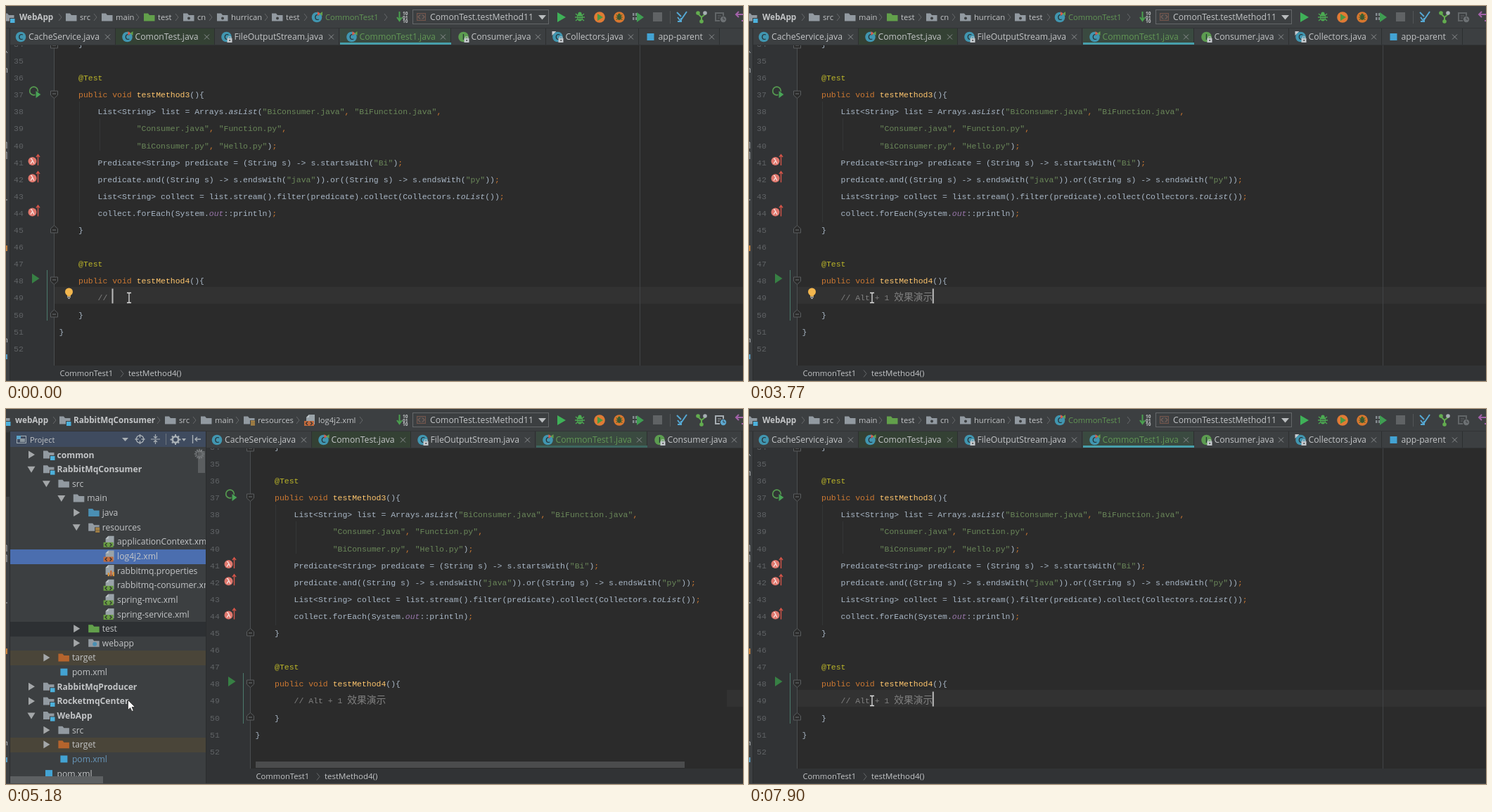
An HTML page for the animation above (8000 ms loop, 1048 px wide and 534 px high).

```html
<!DOCTYPE html>
<html lang="zh">
<head>
<meta charset="utf-8">
<title>Editor with project panel</title>
<style>
html, body { margin: 0; width: 100%; height: 100%; overflow: hidden; background: #2b2b2b; }
svg { display: block; }
text { font-family: "Open Sans", "Noto Sans", sans-serif; white-space: pre; }
.code text { font: 11.47px "Liberation Mono", "Noto Sans Mono", monospace; fill: #a9b7c6; }
.code .cjk { font: 300 13.76px "Noto Sans CJK SC", "Noto Sans CJK", sans-serif; }
.code .num { fill: #606366; }
.code .note, .code .note tspan { fill: #808080; }
.kw { fill: #cc7832; }
.ann { fill: #bbb529; }
.str { fill: #6a8759; }
.fn { fill: #ffc66d; }
.it { font-style: italic; }
.field { fill: #9876aa; font-style: italic; }

.anim { animation: 8s step-end infinite; }
.start-caret { animation-name: startCaret; }
.caret { animation-name: caret; }
.typed { animation-name: typed; }
.bulb { animation-name: bulb; }
.bar { animation-name: bar; }
.editor { animation-name: shift; }
.panel { animation-name: panel; }
.tree-focus { animation-name: treeFocus; }
.editor-focus { animation-name: editorFocus; }
.row { animation-name: row; }
.arrow { animation-name: arrow; }
.beam { animation-name: beam; }
.spin { animation-name: spin; transform-origin: 275px 64px; }
@keyframes startCaret { 0%, 8.875% { opacity: 1 } 3.5%, 13.875%, to { opacity: 0 } }
@keyframes caret {
  0%, 27.375%, 40.125%, 52.125%, 64.75% { opacity: 0 }
  13.875%, 34.75%, 47.125%, 59.125%, 95.75%, to { opacity: 1 }
}
@keyframes typed { 0% { opacity: 0 } 13.875%, to { opacity: 1 } }
@keyframes bulb { 0%, 24.25% { opacity: 1 } 13.875%, 59.125%, to { opacity: 0 } }
@keyframes bar { 0%, 18.875%, to { opacity: 1 } 15.375% { opacity: 0 } }
@keyframes shift { 0%, 92.375%, to { transform: none } 61% { transform: translateX(279px) } }
@keyframes panel { 0%, 92.375%, to { opacity: 0 } 61% { opacity: 1 } }
@keyframes treeFocus { 0%, 94.25%, to { opacity: 0 } 64.75% { opacity: 1 } }
@keyframes editorFocus { 0%, 94.25%, to { opacity: 1 } 64.75% { opacity: 0 } }
@keyframes row { 0%, 92.375%, to { opacity: 1 } 64.75% { opacity: 0 } }
@keyframes arrow { 0%, 92.375%, to { opacity: 0 } 59.125% { opacity: 1 } }
@keyframes beam { 0%, 92.375%, to { opacity: 1 } 59.125% { opacity: 0 } }
@keyframes spin {
  0% { opacity: 1; transform: none }
  62.875% { opacity: 1; transform: rotate(30deg) }
  64.75% { opacity: 1; transform: rotate(60deg) }
  66.375% { opacity: 1; transform: rotate(90deg) }
  68.25%, to { opacity: 0; transform: none }
}
</style>
</head>
<body>
<script>
const GRAY = '#929aa1', GREEN = '#62a04b', BLUE = '#4a8fb3', ORANGE = '#b5642d', LABEL = '#c3c5c7';

const esc = s => s.replace(/&/g, '&amp;').replace(/</g, '&lt;');
const rect = (x, y, w, h, fill, more = '') => `<rect x="${x}" y="${y}" width="${w}" height="${h}" fill="${fill}" ${more}/>`;
const path = (d, fill, more = '') => `<path d="${d}" fill="${fill}" ${more}/>`;
const line = (d, color, width = 1) => path(d, 'none', `stroke="${color}" stroke-width="${width}"`);
const disc = (x, y, r, fill, more = '') => `<circle cx="${x}" cy="${y}" r="${r}" fill="${fill}" ${more}/>`;
const label = (x, y, s, size = 12.2, fill = LABEL, more = '') =>
  `<text x="${x}" y="${y}" font-size="${size}" fill="${fill}" ${more}>${esc(s)}</text>`;
const at = (x, y, body) => `<g transform="translate(${x} ${y})">${body}</g>`;
const group = (name, body) => `<g class="${name}">${body}</g>`;
const anim = (name, body) => group('anim ' + name, body);
const BOLD = 'font-weight="700"';

// Icons, drawn around their centre
const folder = color => path('M-8-5.5h6l2 2.5h7.5v8.5h-15.5z', color);
const lock = rect(1, 2, 7, 6, '#c3c8cc') + line('M2.5 2v-2h4v2', '#c3c8cc') + rect(4, 4, 1.5, 2, '#444');
const ball = (letter, color) => disc(0, 0, 7.3, color) +
  label(0, 4, letter, 11, '#263238', 'text-anchor="middle" font-weight="600"');
const page = path('M-1-8h8v14h-12v-10z', '#9aa3a9') + path('M-1-8v4h-4z', '#c1c7cb');
const badge = color => page + rect(-8, 1, 14, 7, color) + line('M-3 2l-2.5 2.5 2.5 2.5M1 2l2.5 2.5-2.5 2.5', '#2f3133', 1.2);
const icons = {
  folder: folder(GRAY),
  green: folder(GREEN),
  blue: folder(BLUE),
  orange: folder(ORANGE),
  pack: folder(GRAY) + disc(0, 1.5, 2, '#3c3f41'),
  module: folder(GRAY) + rect(1, 1, 7.5, 7, '#3c3f41') + rect(2, 2, 6.5, 6, '#4cb1dc'),
  res: folder(GRAY) + rect(1, 0, 8, 8, '#3c3f41') + line('M2 1.5h6M2 4h6M2 6.5h6', '#d8a145', 1.4),
  web: folder(GRAY) + disc(1, 1.5, 3, BLUE),
  cls: ball('C', '#4196b0'),
  test: ball('C', '#4196b0') + path('M1-8l4 3-4 3z', '#d95b4c') + path('M8-8l-4 3 4 3z', GREEN),
  locked: ball('C', '#4196b0') + lock,
  iface: ball('I', '#5c9c50') + lock,
  marked: ball('C', '#4196b0') + path('M-8-8h6l-6 6z', '#c6cbd0') + lock,
  mvn: rect(-5, -5, 10, 10, '#43a3d3'),
  xml: badge('#689d42'),
  log: badge('#c1693b'),
  props: page + rect(-2, 3, 2.5, 5, '#d8913b') + rect(1.5, 0, 2.5, 8, '#c1693b') + rect(5, 2, 2.5, 6, '#d8913b'),
};
const icon = (name, x, y) => at(x, y, icons[name]);
const chevron = (x, y = 16) => line(`M${x - 2} ${y - 5}l4 5-4 5`, '#66696b');

// Navigation bar
const crumbs = (items, ends) => items.map(([kind, x, s, more, color]) =>
  icon(kind, x, 16) + label(x + (x < 5 ? 15 : 12), 20, s, more ? 11.7 : 11.2, color || LABEL, more || '')).join('') +
  ends.map(x => chevron(x)).join('');
const fileCrumbs = crumbs([
  ['module', 4, 'WebApp', BOLD], ['folder', 93, 'src'], ['folder', 144, 'main'], ['green', 204, 'test'],
  ['pack', 260, 'cn'], ['pack', 308, 'hurrican'], ['pack', 386, 'test'], ['test', 442, 'CommonTest1', '', '#629755'],
], [77, 127, 187, 243, 291, 370, 426, 540]);
const treeCrumbs = crumbs([
  ['module', -2, 'webApp', BOLD], ['module', 84, 'RabbitMqConsumer', BOLD], ['folder', 234, 'src'],
  ['folder', 285, 'main'], ['res', 346, 'resources'], ['log', 432, 'log4j2.xml'],
], [69, 217, 268, 329, 415, 505]);

const bug = color => line('M-6-5l12 10M6-5l-12 10M-7 0h14', color, 1.4) +
  `<ellipse rx="4" ry="5.5" fill="${color}"/>` + disc(0, -5, 2.6, color) + line('M-3-1h6M-3 2h6', '#3c3f41');
const history = (color, clock) => line('M-1 5h-6v-11h11v4', color, 2) + line('M-4-2h5M-4 1h3', color) + disc(4, 3, 4.2, clock) +
  line('M4 0v3h2.5', '#3c3f41');
const toolbar = rect(0, 0, 1048, 32, '#3c3f41') +
  anim('editor-focus', fileCrumbs) + anim('tree-focus', treeCrumbs) +
  line('M559.5 8v12M556 16l3.5 5 3.5-5', '#4ba04f', 2) +
  ['10', '01', '10'].map((s, i) => label(564, 13 + 5.5 * i, s, 6.5, '#c4c7c9', BOLD)).join('') +
  rect(578.5, 5.5, 193, 20, '#3c3f41', 'stroke="#646769"') + rect(584.5, 10.5, 12, 10, '#454546', 'stroke="#75564c"') +
  line('M589 12.5l-3 3 3 3M592 12.5l3 3-3 3', '#9a7468') +
  label(603, 20, 'ComonTest.testMethod11') + path('M757 13h11l-5.5 6.5z', '#b9bcbe') +
  path('M784 9l12 7-12 7z', '#3fb158') + at(816, 16, bug('#4cab52')) +
  disc(844, 16, 7.8, '#e07b35') + path('M841 11l8 5-8 5z', '#4a9a44') +
  at(872, 16, disc(0, 0, 7.8, '#d9772f') + `<g transform="scale(.72)">${bug('#3c612f')}</g>`) +
  [0, 1, 2, 3].map(i => rect(891 + 4 * (i % 2), 10 + 6 * (i >> 1), 2.5, 4, '#82898e')).join('') +
  path('M897 9l10 7-10 7z', '#3f9d52') + rect(920, 9, 13, 13, '#606365') + line('M944.5 7v18', '#535658') +
  line('M955 16l4 5 9-13M954 9l6 6M955 22h5v-5', '#55a7d2', 2) +
  line('M984 11l5 5 6-5M989 16v7', '#63ad4f', 2) + disc(984, 10, 2.8, '#63ad4f') + disc(994, 10, 2.8, '#a7afb4') +
  disc(989, 22, 2.8, '#63ad4f') +
  at(1016, 16, anim('editor-focus', history('#616567', '#6d7174')) + anim('tree-focus', history('#a6adb2', '#5ca8d0'))) +
  line('M1049 12h-11M1042 8l-4 4 4 4M1046 21h3', '#a261a8', 2);

// Editor tabs
const tabs = [
  [6, 'cls', 'CacheService.java', 155], [156, 'test', 'ComonTest.java', 296, '#344134'],
  [297, 'locked', 'FileOutputStream.java', 473], [475, 'test', 'CommonTest1.java', 632, '#3a4a40', '#629755'],
  [634, 'iface', 'Consumer.java', 767], [768, 'marked', 'Collectors.java', 899], [900, 'mvn', 'app-parent', 1014],
].map(([x, kind, s, end, fill = '#3c3f41', color = LABEL], i) =>
  rect(x, 32, end - x, 23, fill) + icon(kind, i ? x + 16.5 : 21, 44) +
  label(i ? x + 27.5 : 32, 48, s, 12.2, color) +
  line(`M${end - 14} 40.5l7 7m0-7l-7 7`, '#8b8e90') + rect(end, 32, 1, 23, '#2d2f30')).join('');

// Code
const rules = [['str', /"[^"]*"/], ['ann', /@Test/], ['kw', /\b(?:public|void)\b|[;,]/], ['fn', /testMethod\d/],
  ['it', /asList|toList/], ['field', /\bout\b/]];
const lexer = new RegExp(rules.map(r => `(${r[1].source})`).join('|'), 'g');
const paint = s => s.replace(lexer, (m, ...g) =>
  `<tspan class="${rules[g.slice(0, rules.length).findIndex(Boolean)][0]}">${esc(m)}</tspan>`).replace(/<(?=String)/g, '&lt;');
const source = `    }

    @Test
    public void testMethod3(){
        List<String> list = Arrays.asList("BiConsumer.java", "BiFunction.java",
                "Consumer.java", "Function.py",
                "BiConsumer.py", "Hello.py");
        Predicate<String> predicate = (String s) -> s.startsWith("Bi");
        predicate.and((String s) -> s.endsWith("java")).or((String s) -> s.endsWith("py"));
        List<String> collect = list.stream().filter(predicate).collect(Collectors.toList());
        collect.forEach(System.out::println);
    }

    @Test
    public void testMethod4(){

    }
}
`.split('\n');
const base = n => 82 + 24.1 * (n - 35);
const code = group('code', source.map((s, i) =>
  `<text class="num" x="11" y="${base(34 + i)}">${34 + i}</text><text x="75.5" y="${base(34 + i)}">${paint(s)}</text>`).join('') +
  `<text class="note" x="130.5" y="${base(49)}">//</text>` +
  anim('typed', `<text class="note" x="151.2" y="${base(49)}">Alt + 1 <tspan class="cjk">效果演示</tspan></text>`));

const fold = (y, dir) => path(`M63.5 ${y - 5 * dir}h10v${6 * dir}l-5 ${4.5 * dir}l-5 ${-4.5 * dir}z`, '#2b2b2b', 'stroke="#5a5d5f"') +
  line(`M66 ${y - dir}h5`, '#6f7274');
const lambda = n => at(37.5, base(n) - 6.5, disc(0, 1, 6, '#e0786e') + line('M-2.5-2.5h1.5l3.5 7M.5 0l-3 4.5', '#f6e6e4', 1.2) +
  line('M8 7v-15M5.5-5l2.5-3.5 2.5 3.5', '#d65549', 1.4));
const gutter = rect(6, 56, 62, 456, '#313335') + line('M68.5 56v456', '#4b4e50') +
  fold(55, -1) + fold(126, 1) + fold(318, -1) + fold(391, 1) + fold(438, -1) +
  disc(39.5, 121, 5.8, 'none', 'stroke="#569b50" stroke-width="1.7"') + path('M42 120l8 6-8 6z', '#48a356', 'stroke="#313335"') +
  [41, 42, 44].map(lambda).join('') + path('M37 381l10.5 7-10.5 7z', '#378044') +
  anim('bar', rect(58, 376, 1, 72, '#4b7a6c'));
const bulb = disc(89.5, 407, 5.5, '#f2b64e') + rect(87, 411, 5, 2.5, '#f2b64e') + rect(87, 414, 5, 1, '#c9cccd') +
  rect(88, 416, 3, 1, '#c9cccd');
const editor = rect(6, 32, 1100, 24, '#3c3f41') + tabs + rect(6, 55, 1100, 1, '#323436') +
  rect(475, 52, 158, 3, '#3c655f') + anim('editor-focus', rect(475, 52, 158, 3, '#479fab')) +
  `<g clip-path="url(#page)">${rect(6, 56, 1100, 456, '#2b2b2b')}${anim('row', rect(69, 400, 1000, 24, '#323232'))}` +
  line('M133.5 160v46M104.5 136v172', '#343637') + line('M901.5 56v456', '#424445') + gutter + code + '</g>' +
  anim('bulb', bulb) + anim('start-caret', rect(150.5, 402.5, 2, 21, '#bbbbbb')) + anim('caret', rect(260.8, 402.5, 2, 21, '#bbbbbb')) +
  rect(6, 512, 1100, 22, '#313335') + label(76.5, 527, 'CommonTest1', 11.2) + chevron(165, 523.5) +
  label(174, 527, 'testMethod4()', 11.5);

// Project tree: depth, arrow (open, closed, none), icon, text, style
const rows = [
  [0, '>', 'module', 'common', BOLD], [0, 'v', 'module', 'RabbitMqConsumer', BOLD], [1, 'v', 'folder', 'src'],
  [2, 'v', 'folder', 'main'], [3, '>', 'blue', 'java'], [3, 'v', 'res', 'resources'],
  [4, '', 'xml', 'applicationContext.xml'], [4, '', 'log', 'log4j2.xml'], [4, '', 'props', 'rabbitmq.properties'],
  [4, '', 'xml', 'rabbitmq-consumer.xml'], [4, '', 'xml', 'spring-mvc.xml'], [4, '', 'xml', 'spring-service.xml'],
  [3, '>', 'green', 'test'], [3, '>', 'web', 'webapp'], [1, '>', 'orange', 'target'], [1, '', 'mvn', 'pom.xml'],
  [0, '>', 'module', 'RabbitMqProducer', BOLD], [0, '>', 'module', 'RocketmqCenter', BOLD], [0, 'v', 'module', 'WebApp', BOLD],
  [1, '>', 'folder', 'src'], [1, '>', 'orange', 'target'], [1, '', 'mvn', 'pom.xml', '', '#6897bb'], [0, '', 'mvn', 'pom.xml'],
];
// Row backgrounds: at rest, and with the tree in focus
const fills = { 'log4j2.xml': ['#0d293e', '#4b6eaf'], test: ['#313834', '#2d3033'], target: ['#4a4539', '#4a4539'] };
const arrows = { '>': 'M-4-5.5l9 5.5-9 5.5z', v: 'M-5.5-4h11l-5.5 9z', '': '' };
const stripe = (y, fill) => rect(6, Math.round(y - 9.8), 278, 21, fill);
const tree = rows.map(([depth, arrow, kind, s, more = '', color = LABEL], i) => {
  const x = 36 + 21.4 * depth, y = 65 + 20.64 * i, fill = fills[s];
  return (fill ? stripe(y, fill[0]) + anim('tree-focus', stripe(y, fill[1])) : '') +
    at(x, y, path(arrows[arrow], '#a4a7a9')) + icon(kind, x + 25, y) + label(x + 36.5, y + 4.5, s, 12.15, color, more);
}).join('');
const spokes = Array.from({ length: 12 }, (_, i) =>
  `<path d="M275 60.5v-3.5" stroke="#b5b9bc" stroke-opacity="${.3 + i * .05}" stroke-width="1.3" transform="rotate(${30 * i} 275 64)"/>`).join('');
const header = rect(6, 32, 278, 22, '#3c3f41') + anim('tree-focus', rect(6, 32, 278, 22, '#3f4b5f')) +
  rect(15.5, 38.5, 13, 10, 'none', 'stroke="#a3adb4"') + rect(15, 38, 6, 5, '#5ba5cb') + rect(20, 42, 7, 5, '#8b969e') +
  label(34, 47.5, 'Project', 10.9) + path('M165 41h9l-4.5 5z', '#a9b0b5') +
  disc(190.5, 43, 5.3, 'none', 'stroke="#a9b0b5" stroke-width="1.4"') + line('M190.5 36v5m0 4v5M183.5 43h5m4 0h5', '#a9b0b5', 1.3) +
  line('M206 43h13M212.5 36v5M210 39l2.5 2.5 2.5-2.5M212.5 50v-5M210 47l2.5-2.5 2.5 2.5', '#a9b0b5', 1.2) +
  line('M227.5 35v16', '#6c757d') + disc(241, 43.5, 4.2, 'none', 'stroke="#a9b0b5" stroke-width="2.6"') +
  line('M241 36v3m0 9v3M233.5 43.5h3m9 0h3M236 38.5l2 2m6 6l2 2M246 38.5l-2 2m-6 6l-2 2', '#a9b0b5', 2) +
  path('M250 42h6l-3 4z', '#a9b0b5') + line('M265.5 37v12M277 43h-8M272 40l-3 3 3 3', '#a9b0b5', 1.4);
const panel = rect(0, 33, 5, 92, '#2d2f30') +
  `<g clip-path="url(#side)">${rect(6, 32, 278, 502, '#3c3f41')}${tree}${header}${rect(273, 60, 10, 31, '#5b5e60')}${anim('spin', spokes)}` +
  rect(6, 523, 132, 10, '#5d6062') + '</g>' + rect(284, 32, 1, 502, '#2b2d2e') +
  rect(355, 502, 610, 9, '#4b4c4d') + anim('tree-focus', rect(1025, 400, 23, 24, '#323232'));

const strip = rect(0, 32, 5, 502, '#3c3f41') + rect(5, 32, 1, 502, '#2a2c2d') +
  line('M0 64l2 3M0 89h1.5v6M0 194h1v9M0 208h1v10M0 276h2M0 474h1.5v5', '#b4b7b9') +
  rect(0, 341, 2, 8, '#c4803c') + rect(0, 496, 2, 7, '#569bc3');
const pointers = anim('beam', line('M172 408.5h2.5l.5.5.5-.5h2.5M175 409v13M172 422.5h2.5l.5-.5.5.5h2.5', '#dedede', 1.3)) +
  anim('arrow', path('M173.5 414.5v14l3.2-3 2.3 5 2.3-1-2.3-5h4.5z', '#ffffff', 'stroke="#222" stroke-width=".7"'));

document.body.innerHTML = `<svg width="1048" height="534" viewBox="0 0 1048 534">
  <defs><clipPath id="page"><rect x="6" y="56" width="1100" height="456"/></clipPath>
  <clipPath id="side"><rect x="6" y="32" width="278" height="502"/></clipPath></defs>
  ${rect(0, 0, 1048, 534, '#2b2b2b')}${anim('editor', editor)}${strip}${anim('panel', panel)}${toolbar}
  ${rect(0, 31, 1048, 1, '#323436')}${rect(0, 533, 1048, 1, '#45484a')}${pointers}</svg>`;
</script>
</body>
</html>
```
